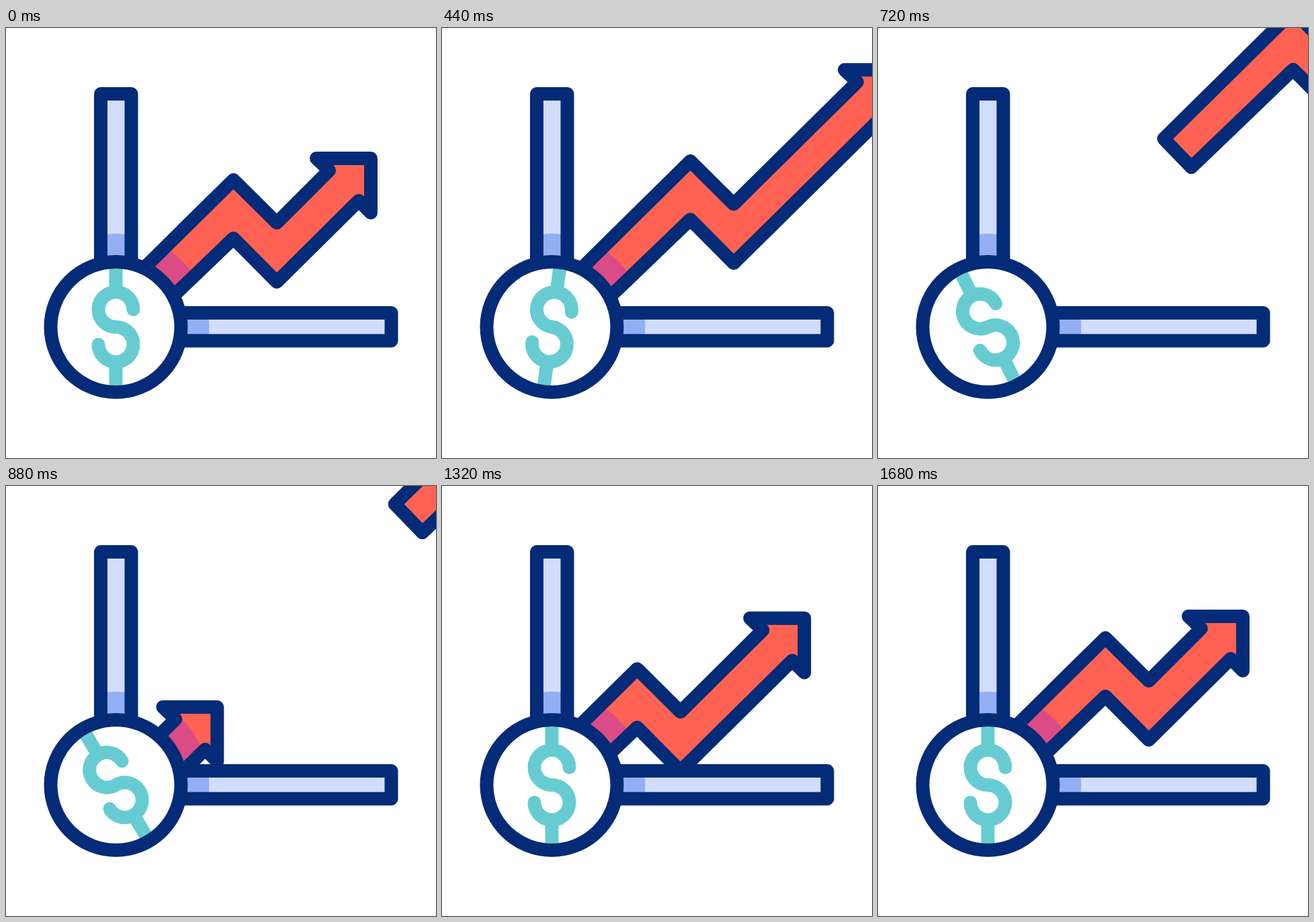
Recreate the animation shown at these times as an HTML page. Size 640 by 640 pixels, loop 2.08 s.

```html
<!DOCTYPE html>
<html lang="en">
<head>
<meta charset="utf-8">
<title>Growth chart</title>
<style>
  html, body { margin: 0; width: 100%; height: 100%; overflow: hidden; background: #fff; }
  svg { display: block; width: 100%; height: 100%; }
  .line { fill: none; stroke: #032b77; stroke-width: 20; stroke-linejoin: round; stroke-linecap: round; }
  .bar { fill: #d2ddfd; }
  .barShade { fill: #93aff3; }
  .arrow { fill: #ff6252; }
  .arrowShade { fill: #db4c86; }
  .dollar { fill: none; stroke: #67ccd2; stroke-width: 20; stroke-linecap: round; }
</style>
</head>
<body>
<svg viewBox="0 0 640 640">
  <defs>
    <clipPath id="halo"><circle cx="163.5" cy="445" r="139"/></clipPath>
    <clipPath id="face"><circle cx="163.5" cy="445" r="97"/></clipPath>
    <clipPath id="plot"><rect x="163" y="-20" width="500" height="465"/></clipPath>
    <path id="axes" d="M141 445V98H186.500V445ZM163 424H573.500V465.500H163Z"/>
  </defs>

  <g id="leaving">
    <path class="arrow"/>
    <path class="arrowShade" clip-path="url(#halo)"/>
    <path class="line"/>
  </g>
  <g id="entering" clip-path="url(#plot)">
    <path class="arrow"/>
    <path class="arrowShade" clip-path="url(#halo)"/>
    <path class="line"/>
  </g>

  <use href="#axes" class="bar"/>
  <use href="#axes" class="barShade" clip-path="url(#halo)"/>
  <use href="#axes" class="line"/>

  <circle cx="163.5" cy="445" r="97" fill="#fff"/>
  <g clip-path="url(#face)">
    <g id="dollar" class="dollar">
      <path d="M163.500 330V390M163.500 500V560"/>
      <path d="M189.500 419A26 26 0 1 0 163.500 445A26 26 0 1 1 137.500 471"/>
    </g>
  </g>
  <circle class="line" cx="163.5" cy="445" r="97"/>
</svg>

<script>
const LOOP = 2080, STEP = 40, LAST = 42;
const $ = id => document.getElementById(id);
const leaving = $('leaving'), entering = $('entering'), dollar = $('dollar');

const upper = [[146, 416], [338.500, 226], [403, 290]];
const head = [[481, 212], [462, 194], [543, 194], [543, 275], [525, 257]];
const lower = [[403, 378], [338.500, 313], [187, 458.500]];

// Eased progress from a to b, 0..1
function ease(t, a, b) {
  const u = Math.min(1, Math.max(0, (t - a) / (b - a)));
  return (1 - Math.cos(Math.PI * u)) / 2;
}

function drawArrow(group, x, y, stretch) {
  const shift = (pts, dx, dy) => pts.map(p => [p[0] + dx, p[1] + dy]);
  const pts = [
    ...shift(upper, x, y),
    ...shift(head, x + stretch, y - stretch * 0.98),
    ...shift(lower, x, y)
  ];
  const d = 'M' + pts.map(p => p[0].toFixed(2) + ' ' + p[1].toFixed(2)).join('L') + 'Z';
  for (const path of group.children) path.setAttribute('d', d);
}

function show(el, on) {
  el.style.display = on ? '' : 'none';
}

function draw(n) {
  // The head stretches out first, then the whole arrow flies off
  show(leaving, n < 28);
  if (n < 28) {
    const go = ease(n, 8, 27);
    drawArrow(leaving, 516 * go, -464 * go, 170 * ease(n, 0, 19));
  }

  // The next arrow arrives head first and its body catches up
  show(entering, n >= 18);
  if (n >= 18) {
    const stretch = 71 * (1 - ease(n, 26.5, LAST));
    const x = -1.44 * Math.max(0, 34.6 - n) ** 2;
    const y = 0.824 * Math.max(0, 34.8 - n) ** 2;
    drawArrow(entering, x - stretch, y + stretch * 0.98, stretch);
  }

  const angle = 15 * ease(n, 0, 7.5) - 47 * ease(n, 7.5, 21) + 32 * ease(n, 21, 28.6);
  dollar.setAttribute('transform', `rotate(${angle.toFixed(3)} 163.5 445)`);
}

const start = performance.now();
function tick() {
  const t = (performance.now() - start) % LOOP;
  draw(Math.min(LAST, Math.floor(t / STEP)));
  requestAnimationFrame(tick);
}
tick();
</script>
</body>
</html>
```
